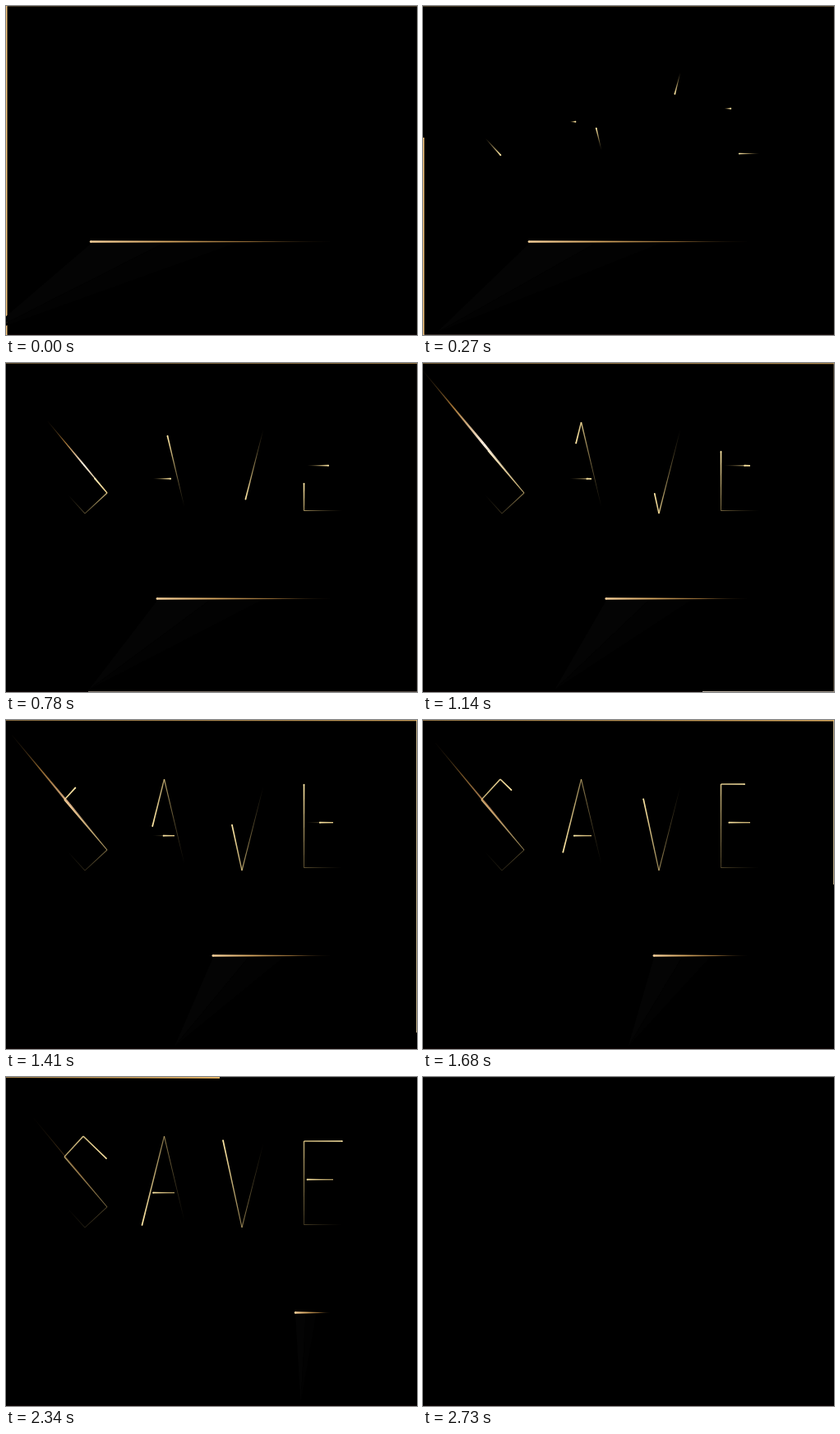
Recreate the animation shown at these times as an HTML page with a canvas. Size 500 by 400 pixels, loop 2.79 s.

```html
<!DOCTYPE html>
<html lang="en">
<head>
<meta charset="utf-8">
<title>Light strokes</title>
<style>
  html, body { margin: 0; width: 100%; height: 100%; overflow: hidden; background: #000; }
  canvas { display: block; width: 500px; height: 400px; }
</style>
</head>
<body>
<canvas id="stage" width="500" height="400"></canvas>
<script>
const ctx = document.getElementById('stage').getContext('2d');
const W = 500, H = 400, LOOP = 2790, STEP = 30, END = 2730;
const TOP = 72, BASE = 183;

const clamp = (v, lo = 0, hi = 1) => Math.min(hi, Math.max(lo, v));
const mix = (a, b, k) => a + (b - a) * k;
const between = (a, b, k) => [mix(a[0], b[0], k), mix(a[1], b[1], k)];
const distance = (a, b) => Math.hypot(b[0] - a[0], b[1] - a[1]);

// A dash runs to the right and back again.
const dash = (left, right, y) => [[left, y], [right, y], [left, y]];
const bracket = (left, right, top, base) => [[right, base], [left, base], [left, top], [right, top]];

const corner = [123, 158];
const strokes = [
  [[76, 161], [96, BASE], corner, [71, 97], [94, TOP], [122, 99]],
  [[217, 175], [192.5, TOP], [165.5, 180]],
  [[313, 81], [287, BASE], [264, 77]],
  bracket(362.5, 409, 78, 179.5),
  dash(179, 205, 140.7),
  dash(366.5, 398, 124.7)
];

// Linear gradient with evenly spaced colours.
function gradient(from, to, ...colors) {
  const g = ctx.createLinearGradient(...from, ...to);
  colors.forEach((color, i) => g.addColorStop(i / (colors.length - 1), color));
  return g;
}

function polygon(fill, ...points) {
  ctx.fillStyle = fill;
  ctx.beginPath();
  points.forEach(p => ctx.lineTo(...p));
  ctx.fill();
}

function dot([x, y], radius) {
  ctx.beginPath();
  ctx.arc(x, y, radius, 0, 2 * Math.PI);
  ctx.fill();
}

// A straight piece whose width changes evenly from end to end.
function taper(fill, a, b, widthA, widthB) {
  const length = distance(a, b);
  const nx = (a[1] - b[1]) / length / 2, ny = (b[0] - a[0]) / length / 2;
  const side = ([x, y], w) => [x + nx * w, y + ny * w];
  polygon(fill, side(a, widthA), side(b, widthB), side(b, -widthB), side(a, -widthA));
}

// Draws the first part of a path, growing brighter and thicker towards its head.
function drawStroke(points, part, light) {
  const lengths = points.slice(1).map((p, i) => distance(points[i], p));
  const drawn = part * lengths.reduce((a, b) => a + b);
  const color = u => `rgba(255,${mix(215, 232, u)},${mix(120, 165, u)},${u ** 0.9 * light})`;
  const width = u => 0.6 + 1.1 * u;
  let start = 0;
  lengths.forEach((length, i) => {
    const visible = Math.min(length, drawn - start);
    if (visible <= 0) return;
    const from = points[i], to = between(from, points[i + 1], visible / length);
    const u0 = start / drawn, u1 = (start + visible) / drawn;
    taper(gradient(from, to, color(u0), color(u1)), from, to, width(u0), width(u1));
    if (u1 > 0.999) dot(to, width(1) / 2);
    start += length;
  });
}

// A flare shoots out of the first letter's corner, then slowly sinks back.
function drawStreak(t, light) {
  const rise = clamp((t - 560) / 580), fall = clamp((t - 1140) / 1200);
  if (rise <= 0) return;
  const length = mix(193, 140, fall) * rise ** 0.55;
  const at = d => [corner[0] - 0.638 * d, corner[1] - 0.77 * d];
  const middle = at(length * 0.4), tip = at(length);
  const glow = 1 - 0.65 * fall;
  const hot = `rgb(255,${mix(242, 165, Math.sqrt(fall))},${mix(228, 80, Math.sqrt(fall))})`;
  const width = mix(1.5, 3.2, rise) * glow;
  ctx.globalAlpha = glow * light;
  const root = `rgba(255,225,150,${mix(0.9, 0.35, rise)})`;
  taper(gradient(corner, middle, root, hot), corner, middle, 1, width);
  taper(gradient(middle, tip, hot, 'rgba(205,145,65,.8)', 'rgba(110,75,30,.1)'), middle, tip, width, 0.4);
  ctx.globalAlpha = 1;
}

function drawBar(p) {
  const head = [mix(103, 394, p), 286.4], tail = [394, 286.4];
  const apex = [mix(-23, 423, p), 397];
  const along = k => [mix(head[0], tail[0], k), 289];
  polygon('#040404', along(0), along(0.3), apex);
  polygon('#020202', along(0.3), along(0.6), apex);
  if (p >= 1) return;
  const fill = gradient(head, tail, '#f6d09a', '#d6a660', '#85602f', 'rgba(50,34,14,.1)');
  taper(fill, head, tail, 2.5, 0.5);
  dot(head, 1.25);
}

// The frame is eaten up down the left, along the bottom, up the right and back along the top.
function drawBorder(p) {
  const gone = p * 2 * (W + H);
  polygon('#141414', [0, 0], [W, 0], [W, 1], [0, 1]);
  polygon('#100606', [0, H - 1], [W, H - 1], [W, H], [0, H]);

  const left = Math.min(H, gone);
  ctx.fillStyle = '#f3c47e';
  ctx.fillRect(0, left, 1.5, H - left);

  const bottom = clamp(gone - H, 0, W);
  const shine = clamp(gone / (W + H));
  const gray = k => `rgba(225,215,200,${k * shine})`;
  ctx.fillStyle = gradient([bottom, 0], [W, 0], gray(1), gray(mix(0.15, 0.9, shine)));
  ctx.fillRect(bottom, H - 1, W - bottom, 1);

  const right = clamp(W + 2 * H - gone, 0, H);
  ctx.fillStyle = `rgba(232,210,164,${mix(0.05, 0.8, shine ** 6)})`;
  ctx.fillRect(W - 1, 0, 1, right);

  const top = clamp(2 * (W + H) - gone, 0, W);
  const power = mix(0.3, 1, clamp(p / 0.75));
  const gold = k => `rgba(248,194,108,${power * k})`;
  if (top > 0) polygon(gradient([0, 0], [top, 0], gold(0.6), gold(1)), [0, 0], [top, 0], [top, mix(0.7, 1.8, power ** 2)], [0, 1]);
}

function draw(t) {
  ctx.fillStyle = '#000';
  ctx.fillRect(0, 0, W, H);
  const p = clamp((t - STEP) / (END - STEP));
  drawBorder(p);
  if (t >= END) return;
  drawBar(p);
  const part = clamp((t - 45) / 1800);
  const light = clamp((2700 - t) / 300);
  if (part <= 0 || light <= 0) return;
  strokes.forEach(points => drawStroke(points, part, light));
  drawStreak(t, light);
}

const begin = performance.now();
function tick() {
  const t = (performance.now() - begin) % LOOP;
  draw(Math.floor(t / STEP) * STEP);
  requestAnimationFrame(tick);
}
tick();
</script>
</body>
</html>
```
